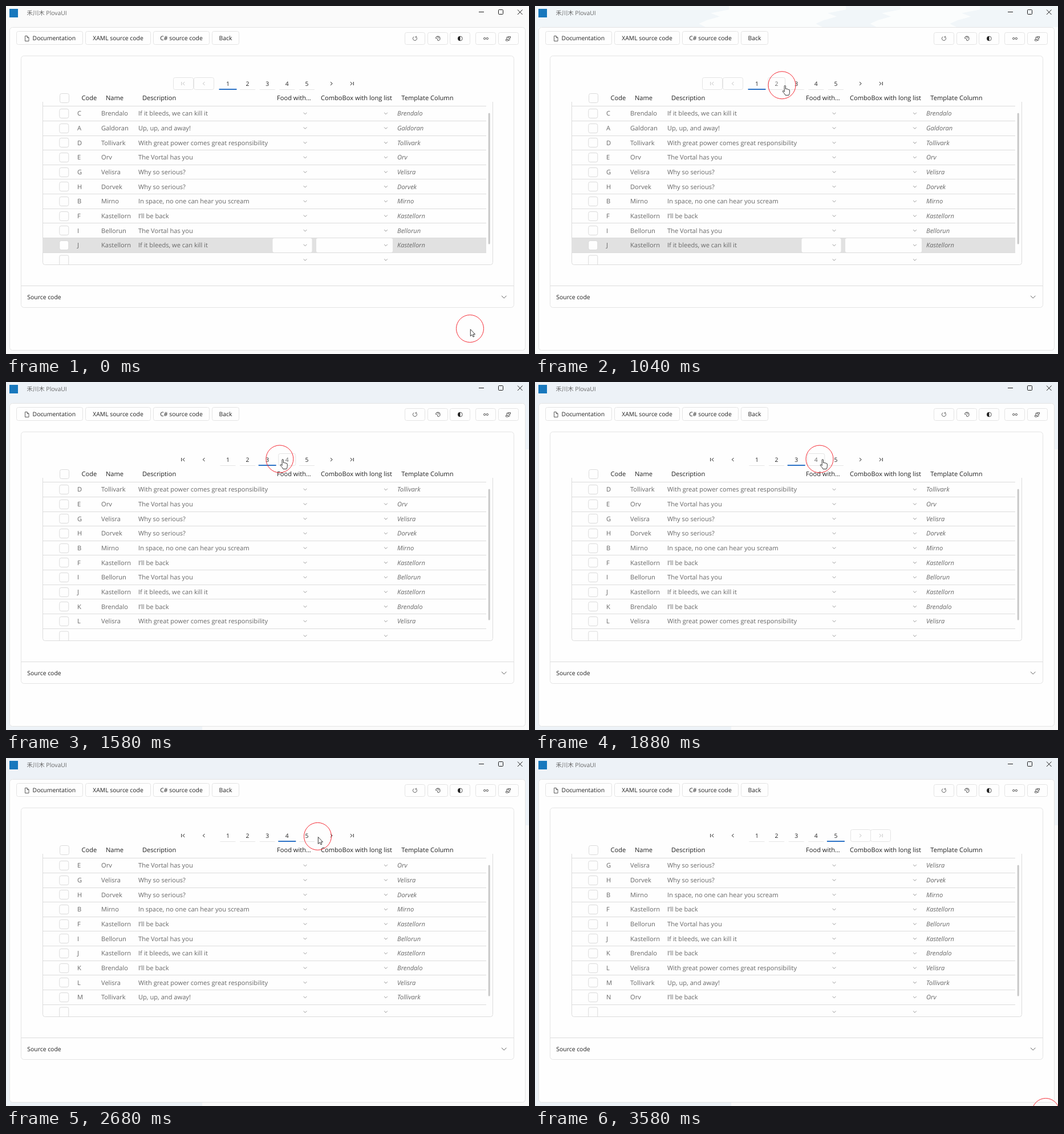
These frames come from a looping animation (917x610 px, 3940 ms). An HTML page:

```html
<!DOCTYPE html>
<html lang="en">
<head>
<meta charset="utf-8">
<title>Paged table</title>
<style>
html, body { margin: 0; width: 100%; height: 100%; overflow: hidden; background: #fafafa; }
svg { display: block; width: 100vw; height: 100vh; }
text { font: 11.1px "Open Sans", "Noto Sans", "Noto Sans CJK SC", sans-serif; text-rendering: geometricPrecision; fill: #222; white-space: pre; }
.small { font-size: 10.4px; }
.mid { text-anchor: middle; }
.cell { fill: #676767; }
.slant { font-style: italic; }
.box { fill: #fefefe; stroke: #e4e4e4; }
.check { fill: #fefefe; stroke: #dadada; }
.white { fill: #fefefe; }
.rule { stroke: #dcdcdc; fill: none; }
.ico { fill: none; stroke: #4a4a4a; stroke-width: .9; }
.dark { fill: none; stroke: #1c1c1c; }
.faint { fill: none; stroke: #c2c2c2; }
.drop { fill: none; stroke: #8a8a8a; stroke-width: .9; }
.mica { fill: #f1f6f9; }
</style>
</head>
<body>
<svg viewBox="0 0 917 610">
  <g id="backdrop"></g>
  <g id="shell"></g>
  <g id="table"></g>
  <g id="pointer">
    <circle r="24" fill="none" stroke="#f52a34"/>
    <path id="arrow" d="M.8 1.2V13.2L3.6 10.6L5.5 14.6L7.4 13.7L5.6 9.9H9Z" fill="#fff" stroke="#222" stroke-width=".9"/>
    <path id="hand" d="M4.2 11.5V2Q4.2 .6 5.3 .6T6.5 2V6.7Q7.8 5.6 8.9 7Q10.2 6.2 11.2 7.7Q13.3 7.2 13.4 9.2V12.4Q13.4 14.8 12 17.6H6Q4.7 14.6 2.2 12.4Q.5 10.5 1.7 9.8Q2.7 9.3 4.2 11.5Z" fill="#fff" stroke="#222" stroke-width=".9"/>
  </g>
</svg>
<script>
const LOOP = 3940, STEP = 55, PRESS = 45;
const PAGE_STARTS = [0, 1090, 1360, 2040, 2800];
const HOME = { x: 813.5, y: 565.5 };

// Pointer moves; each one slows down towards its end.
const MOVES = [
  { from: 0, to: 385, x: 438.5, y: 176.5 },
  { from: 400, to: 700, x: 433, y: 138.8 },
  { from: 1110, to: 1320, x: 454, y: 134.8 },
  { from: 1380, to: 1840, x: 499, y: 135 },
  { from: 1990, to: 2190, x: 653, y: 163 },
  { from: 2190, to: 2500, x: 546.5, y: 137.3 },
  { from: 2680, to: 2780, x: 527, y: 134 },
  { from: 2830, to: 3170, x: 806.5, y: 612.5 },
  { from: 3170, to: 3240, x: 840, y: 690 },
  { from: 3410, to: 3570, x: 895.5, y: 620.5 }
];

const QUOTES = {
  bleed: "If it bleeds, we can kill it", away: "Up, up, and away!",
  power: "With great power comes great responsibility", has: "The Vortal has you",
  why: "Why so serious?", space: "In space, no one can hear you scream", back: "I’ll be back"
};
const ROWS = `C Brendalo bleed|A Galdoran away|D Tollivark power|E Orv has|G Velisra why
H Dorvek why|B Mirno space|F Kastellorn back|I Bellorun has|J Kastellorn bleed
K Brendalo back|L Velisra power|M Tollivark away|N Orv back`.split(/[|\n]/).map(row => row.split(" "));
const SELECTED = 9, VISIBLE = 10;

const $ = id => document.getElementById(id);
const repeat = (n, build) => Array.from({ length: n }, (_, i) => build(i)).join("");
const text = (x, y, s, cls = "") => `<text x="${x}" y="${y}" class="${cls}">${s}</text>`;
const rect = (x, y, w, h, cls = "box", r = 3) =>
  `<rect x="${x}" y="${y}" width="${w}" height="${h}" rx="${r}" class="${cls}"/>`;
const fill = (color, x, y, w, h, r = 0) =>
  `<rect x="${x}" y="${y}" width="${w}" height="${h}" rx="${r}" fill="${color}"/>`;
const path = (d, cls = "ico") => `<path d="${d}" class="${cls}"/>`;
const ring = (x, y, r) => `<circle cx="${x}" cy="${y}" r="${r}" class="ico"/>`;
const chevron = (x, y, size, cls) => path(`M${x - size} ${y - size / 2}l${size} ${size}l${size} ${-size}`, cls);

function button(x, width, label, shift = 0) {
  return rect(x, 44.5, width, 23) + text(x + width / 2 + shift, 60, label, "small mid");
}

function toolIcons() {
  return path("M719 54.1a3.5 3.5 0 1 1 -3.6 -.3M719.2 52.6v1.9h-1.9")
    + path("M753.3 56.5a4 4 0 1 1 4.8 4.3q-1.8 0 -1.2 -1.8q.5 -1.8 -1.3 -1.9ZM755.8 55a1.7 1.7 0 0 1 3 2.2")
    + ring(796.3, 57, 3.9) + '<path d="M796.3 53a4 4 0 0 0 0 8Z" fill="#1f1f1f"/>'
    + ring(839.2, 57, 1.7) + ring(843.8, 57, 1.7)
    + path("M880.5 53.5h4v2.5h-4ZM876.5 58.5h4v2.5h-4ZM880.5 54.5h-2.5v4M880.5 60h2.5v-4");
}

function shell() {
  return rect(6.5, 37.5, 904, 566, "box", 5)
    + fill("#1878bd", 6, 5, 15, 15)
    + text(36.5, 16, "禾川木 PlovaUI", "cell small")
    + path("M829 10.5h9M897 6.5l8.5 8.5M905.5 6.5l-8.5 8.5", "dark") + rect(863.5, 6.5, 8, 8, "dark", 1)
    + button(18.5, 116, "Documentation", 7.8) + button(139.5, 114, "XAML source code")
    + button(258.5, 98, "C# source code") + button(361.5, 47, "Back")
    + path("M33.5 52.5h3.5l3 3v6h-6.5ZM37 52.5v3h3")
    + [699.5, 739.5, 778.5, 823.5, 863.5].map(x => rect(x, 46.5, 35, 21)).join("") + toolIcons()
    + rect(26.5, 87.5, 864, 441, "box", 5) + path("M26.5 490.5H890.5", "rule")
    + text(37.3, 513.5, "Source code", "small") + chevron(873.2, 510, 4.2, "ico")
    + path("M64.5 168V449.5q0 4 4 4H849.5q4 0 4 -4V168", "rule")
    + fill("#c8c8c8", 845.7, 187.5, 3, 230, 1.5)
    + rect(94.5, 153.5, 16, 16, "check")
    + text(132.5, 165.3, "Code") + text(175, 165.3, "Name") + text(239, 165.3, "Description")
    + text(475, 165.3, "Food with...") + text(552, 165.3, "ComboBox with long list")
    + text(693.3, 165.3, "Template Column");
}

const pageX = i => 389 + 34.6 * i;

function navButton(cx, dir, bar, off) {
  const tip = cx + dir * (bar ? .8 : 1.6);
  return (off ? rect(Math.round(cx - 18) + .5, 125.5, 35, 21) : "")
    + path(`M${tip - dir * 3} 133l${dir * 3} 3l${-dir * 3} 3` + (bar ? `M${cx + dir * 3.2} 133v6` : ""),
      off ? "faint" : "dark");
}

function pager(page, hover, pressed) {
  const first = page === 0, last = page === 4;
  return navButton(311, -1, true, first) + navButton(347, -1, false, first)
    + navButton(570.5, 1, false, last) + navButton(606, 1, true, last)
    + repeat(5, i => {
      const x = pageX(i), label = cls => text(x, 139.7, i + 1, "small mid " + cls);
      if (i === page) return label("") + fill("#2b72c6", x - 15.5, 145, 31, 2);
      if (i !== hover) return label("") + fill("#e6e6e6", x - 13.5, 146, 27, 1);
      return rect(x - 15, 125.5, 30, 21) + `<g opacity="${pressed ? .6 : 1}">${label("cell")}</g>`;
    });
}

function gridRow(page, i) {
  const top = Math.floor(175.7 + 25.65 * i) + .5, mid = 188.3 + 25.66 * i, chosen = page + i === SELECTED && !page;
  const [code, name, quote] = ROWS[page + i], base = mid + 4;
  return (chosen ? fill("#e1e1e1", 64, top, 778, 26) : "")
    + path(`M64 ${top}H842`, "rule")
    + (chosen ? rect(467.5, top + .5, 69, 25, "white") + rect(544, top + .5, 134, 25, "white") : "")
    + (i < VISIBLE ? rect(93.8, Math.round(mid - 8.3) + .5, 16, 16, "check")
      + text(125, base, code, "cell") + text(167, base, name, "cell")
      + text(232, base, QUOTES[quote], "cell") + text(686, base, name, "cell slant")
      : path("M93.8 453V439.5q0 -2.5 2.5 -2.5h11q2.5 0 2.5 2.5V453", "check"))
    + chevron(524.5, mid, 2.8, "drop") + chevron(666, mid, 2.8, "drop");
}

// A patch of the title bar with slanted, ragged brush ends.
function brush(left, right) {
  const edge = (x, i) => `${x - 9 * i + 14 * Math.sin(i * 2.4)} ${i * 6.2}`;
  const side = x => Array.from({ length: 7 }, (_, i) => edge(x, i));
  return path("M" + [...side(left), ...side(right).reverse()].join("L") + "Z", "mica");
}

const BACKDROPS = [
  () => "",
  () => fill("#fbfdfd", 0, 0, 917, 610) + brush(-30, 340) + brush(545, 640) + brush(780, 990)
    + rect(0, 0, 6, 270, "mica", 0),
  () => `<g fill="#edf2f7">${path("M0 0H917V118H910V38H7V603H344V610H0Z", "")}</g>`
];

function pointerAt(t) {
  let { x, y } = HOME;
  for (const move of MOVES) {
    if (t < move.from) break;
    const left = 1 - Math.min(1, (t - move.from) / (move.to - move.from)), k = 1 - left * left;
    x += (move.x - x) * k;
    y += (move.y - y) * k;
  }
  return { x, y };
}

function hoveredPage({ x, y }) {
  const tip = x + 5, i = Math.round((tip - pageX(0)) / 34.6);
  const inside = Math.abs(tip - pageX(i)) < 15.8 && Math.abs(y - 135) < 12;
  return inside && i >= 0 && i < 5 ? i : -1;
}

const shown = {};
function show(id, key, build) {
  if (shown[id] === key) return;
  shown[id] = key;
  $(id).innerHTML = build();
}

function draw(t) {
  const spot = pointerAt(Math.floor(t / STEP) * STEP), hover = hoveredPage(spot);
  const page = PAGE_STARTS.filter(s => t >= s).length - 1;
  const pressed = PAGE_STARTS.some(s => t >= s - PRESS && t < s);
  const back = t < 580 ? 0 : page ? 2 : 1;

  show("backdrop", back, BACKDROPS[back]);
  show("table", [page, hover, pressed].join(),
    () => repeat(VISIBLE + 1, i => gridRow(page, Math.min(i, VISIBLE))) + pager(page, hover, pressed));
  $("pointer").setAttribute("transform", `translate(${spot.x} ${spot.y})`);
  $("arrow").style.display = hover < 0 ? "" : "none";
  $("hand").style.display = hover < 0 ? "none" : "";
}

ROWS.push(["", "", ""]);
$("shell").innerHTML = shell();
const start = performance.now();
function tick() {
  draw((performance.now() - start) % LOOP);
  requestAnimationFrame(tick);
}
tick();
</script>
</body>
</html>
```
